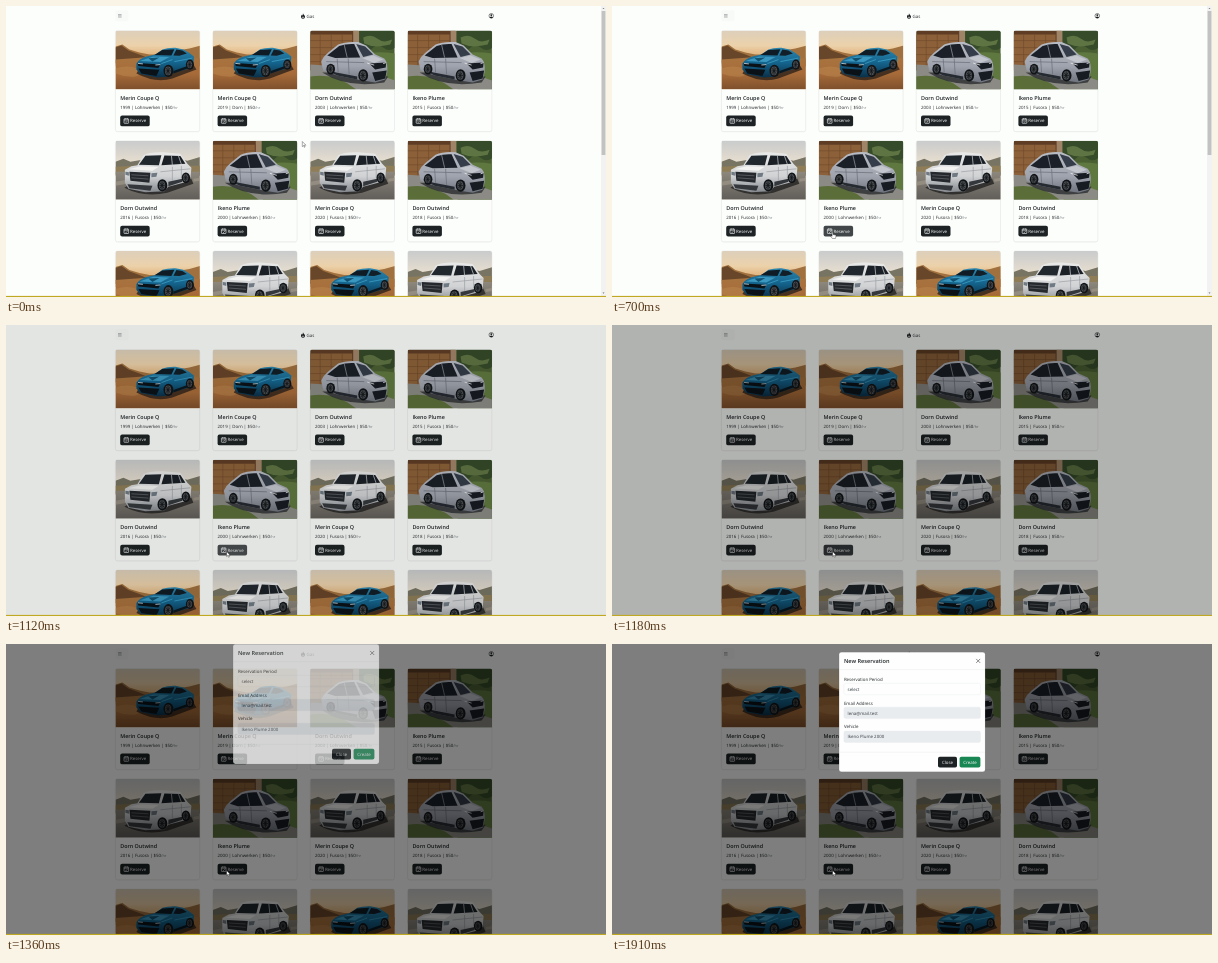
These frames come from a looping animation (600x291 px, 1940 ms). An HTML page:

```html
<!DOCTYPE html>
<html lang="en">
<head>
<meta charset="utf-8">
<title>Car reservation</title>
<style>
html, body { margin: 0; width: 100%; height: 100%; overflow: hidden; background: #fcfefb; }
svg { display: block; width: 100vw; height: 100vh; }
text { font-family: "Open Sans", "Noto Sans", sans-serif; font-size: 4.4px; fill: #212529; text-rendering: geometricPrecision; white-space: pre; }
.title { font-size: 5.4px; font-weight: 600; }
.light { fill: #fff; }
.muted { fill: #7d848a; font-size: 3.8px; }
</style>
</head>
<body>
<svg id="stage" viewBox="0 0 600 291" preserveAspectRatio="none">
  <defs>
    <linearGradient id="dusk" x2="0" y2="1">
      <stop stop-color="#dccfbb"/><stop offset=".25" stop-color="#ecd2ab"/><stop offset=".45" stop-color="#dfae74"/>
    </linearGradient>
    <linearGradient id="sand" x2="0" y2="1">
      <stop stop-color="#a8743f"/><stop offset=".5" stop-color="#a76b39"/><stop offset="1" stop-color="#7d4f2c"/>
    </linearGradient>
    <linearGradient id="overcast" x2="0" y2="1">
      <stop stop-color="#c9cbcc"/><stop offset=".4" stop-color="#e9dfcf"/>
    </linearGradient>
    <linearGradient id="road" x2="0" y2="1">
      <stop stop-color="#8d877c"/><stop offset="1" stop-color="#605d59"/>
    </linearGradient>
    <linearGradient id="blue" x2="0" y2="1">
      <stop stop-color="#2b86ae"/><stop offset=".5" stop-color="#14648d"/><stop offset="1" stop-color="#0a2f47"/>
    </linearGradient>
    <linearGradient id="silver" x2="0" y2="1">
      <stop stop-color="#b9bcc4"/><stop offset=".6" stop-color="#9fa3ad"/><stop offset="1" stop-color="#6d727c"/>
    </linearGradient>
    <linearGradient id="white" x2="0" y2="1">
      <stop stop-color="#e9e9e8"/><stop offset=".6" stop-color="#d0d2d4"/><stop offset="1" stop-color="#85898e"/>
    </linearGradient>
    <clipPath id="photo"><path d="M0 59V2Q0 0 2 0H82.3Q84.3 0 84.3 2V59Z"/></clipPath>

    <g id="wheel">
      <ellipse rx="4.9" ry="6.2" fill="#111417"/>
      <ellipse cx="-.3" rx="3.1" ry="4.3" fill="#4b4f53"/>
      <path d="M-.4-4V4M-3 0H2.4M-2.4-2.8 1.6 2.8M1.6-2.8-2.4 2.8" stroke="#15181b" stroke-width=".8"/>
    </g>

    <g id="coupe" clip-path="url(#photo)">
      <rect width="85" height="59" fill="url(#dusk)"/>
      <path d="M0 16 7 14 14 19 24 22 34 24H50L62 20 74 18 85 15V36H0Z" fill="#a0713f"/>
      <path d="M0 17 6 15 13 20 24 24 34 28 0 33Z" fill="#684629"/>
      <path d="M0 29 28 27 85 28V59H0Z" fill="url(#sand)"/>
      <path d="M0 38Q12 34 22 38T20 46Q10 47 0 43Z" fill="#bc8850" opacity=".5"/>
      <path d="M21 43Q40 53 57 48L81 39 78 34 24 38Z" fill="#35261c" opacity=".85"/>
      <path d="M21 33Q24 28 31 26L40 24 47 18.8Q52 17 60 17.2L68 18.8 74 22.5 78.5 26 78 34 74 38 58 42.5 54 46 42 47 25 43.5 21 39Z" fill="url(#blue)"/>
      <path d="M39 24.3 47 19.4 59 18.7 56 25Z" fill="#0f1c25"/>
      <path d="M58 24.8 61 18.9 67 19.9 71.5 22.9 64 25.1Z" fill="#121f28"/>
      <path d="M24 30.5 38 25.8 54 26.4 45 31.5Z" fill="#3a97bf"/>
      <path d="M33 27.6 44 27 37 31Z" fill="#12506f"/>
      <path d="M22 32.5 45 33.8 43 37.5 23 35.4ZM23 38 44 39.2 41 45.5 26 43Z" fill="#0a1218"/>
      <path d="M22.5 32.8 27.5 33.3M40 34.4 45 34" stroke="#cfe5ee" stroke-width=".8"/>
      <path d="M59 31 77 27.5M46 33 57 29" stroke="#3d9fc6" stroke-width=".8"/>
      <path d="M58 40.5 72 35.5V38L58 43Z" fill="#0a1821"/>
      <use href="#wheel" x="53" y="40.3"/><use href="#wheel" transform="translate(74.5 34) scale(.82)"/>
    </g>

    <g id="hatch" clip-path="url(#photo)">
      <rect width="85" height="59" fill="#4a5f32"/>
      <path d="M0 0H48V40H0Z" fill="#5f3d25"/>
      <path d="M0 4H42V36H0Z" fill="#8c6039"/>
      <path d="M0 10H42M0 17H42M0 24H42M0 31H42M10 4V36M21 4V36M32 4V36" stroke="#704a2a" stroke-width=".6"/>
      <path d="M43 0H49V38H43Z" fill="#a08467"/>
      <path d="M49 0H85V17Q79 22 73 17T61 19L49 18Z" fill="#354b29"/>
      <path d="M53 7Q61 3 67 8T82 9L80 14Q64 18 54 13Z" fill="#5f7443"/>
      <path d="M50 24Q66 20 85 23V59H50Z" fill="#5f783f"/>
      <path d="M0 34 47 37 85 50V59H0Z" fill="#8b8a84"/>
      <path d="M0 46Q26 42 46 59H0Z" fill="#5b6e3a"/>
      <path d="M12 42Q36 58 74 52L78 46 40 42Z" fill="#303334" opacity=".85"/>
      <path d="M11 31Q13 26 18 22L28 14Q36 10.5 48 11.5L56 15 65 24 74 28Q78 32 77 42L75 49 65 52 52 50 27 45 13 40Z" fill="url(#silver)"/>
      <path d="M17 25 29 15.5Q36 13 44 13.5L50 27 25 27.5Z" fill="#1b2028"/>
      <path d="M46 13.3 55 16 63 24 53 26.5Z" fill="#343d49"/>
      <path d="M34 14 37 27" stroke="#8a8e97" stroke-width=".8"/>
      <path d="M52 27.5 63 25 73 29 64 32.5Z" fill="#c3c6cd"/>
      <path d="M59 33 76 32 75.5 37 65 39ZM62 42 76.5 40 75 48 65 50.5Z" fill="#171b22"/>
      <path d="M57 32.5 64 34.5M73 33 76 32" stroke="#eceef0" stroke-width=".8"/>
      <path d="M15 39 26 42 47 46V49L27 45Z" fill="#262a31"/>
      <path d="M16 31 54 32M38 28 39 44M27 28 28 42" stroke="#686d77" stroke-width=".7"/>
      <use href="#wheel" x="53" y="44.8"/><use href="#wheel" transform="translate(20.5 38.5) scale(.88)"/>
    </g>

    <g id="suv" clip-path="url(#photo)">
      <rect width="85" height="59" fill="url(#overcast)"/>
      <path d="M0 21 8 18 15 21 27 19 44 20 62 18 72 20 85 16V35H0Z" fill="#777464"/>
      <path d="M0 26 18 25 85 25V34H0Z" fill="#8e7d57"/>
      <path d="M0 31H85V59H0Z" fill="url(#road)"/>
      <path d="M0 41 12 39V43L0 45ZM78 38 85 37V40L78 41Z" fill="#a39b8d" opacity=".6"/>
      <path d="M9 47Q28 57 52 52L78 43 75 36 20 40Z" fill="#282726" opacity=".85"/>
      <path d="M9.5 29 16 25.5 22 24.5 28 14.5Q34 11 48 11.5L65 13 72 23 76 27 75 38 68 42 53 46 49 50.5 30 51.5 13 48 9.5 42Z" fill="url(#white)"/>
      <path d="M23.5 24 30 15 46 14.4 43.5 24.5Z" fill="#21282e"/>
      <path d="M46 24.5 49 14.6 65 15.2 70 23Z" fill="#1a2026"/>
      <path d="M56 14.5 57 24.5M63 15 66 23.5" stroke="#b9bcbe" stroke-width=".8"/>
      <path d="M13 28.5 25 25.5 43 26.2 37 30Z" fill="#f3f3f2"/>
      <path d="M14 31 35 32 34 42 15 40Z" fill="#25292d"/>
      <path d="M16 34 33 35M16 37 33 38.3" stroke="#74787c" stroke-width=".6"/>
      <path d="M10 31 13.5 31.5V35L10 34ZM36 32.5 42 32 41 36 36 36.4Z" fill="#6f7a84"/>
      <path d="M12 43.5 37 45 35 50 14 47.5Z" fill="#34383c"/>
      <path d="M53 41 67 38V41L53 45.5Z" fill="#34383c"/>
      <path d="M45 31 75 28M57 26V40M66 25V37" stroke="#94989c" stroke-width=".6"/>
      <use href="#wheel" x="47" y="44.6"/><use href="#wheel" transform="translate(70.5 37) scale(.86)"/>
    </g>

    <g id="calendar" fill="none" stroke="#fff" stroke-width=".6">
      <rect width="4.6" height="4.5" rx=".5"/><path d="M0 1.2H4.6M1.2-.5V.5M3.4-.5V.5M1.4 2.8 2.1 3.5 3.4 2.2"/>
    </g>
  </defs>

  <rect width="600" height="291" fill="#fcfefb"/>
  <rect x="109.4" y="4.3" width="13" height="11" rx="1.8" fill="#f8faf8"/>
  <path d="M112 8.5H115.6M112 9.8H115.6M112 11.1H115.6" stroke="#777b7d" stroke-width=".5"/>
  <path d="M297 7.3C297.2 9 299 9.2 299 10.8A2 2 0 0 1 295 10.8C295 9.9 295.5 9.3 295.9 8.8L296.3 9.7C296.9 9 296.8 8.2 297 7.3Z" fill="#15181a"/>
  <path d="M297 10.2 297.8 11.4A.9.9 0 0 1 296.2 11.4Z" fill="#fcfefb"/>
  <text x="300.6" y="11.7">Gas</text>
  <circle cx="485.3" cy="9.8" r="2.3" fill="none" stroke="#15181a" stroke-width=".5"/>
  <circle cx="485.3" cy="9.1" r=".95" fill="#15181a"/>
  <path d="M483.6 11.5Q485.3 9.6 487 11.5 485.3 12.9 483.6 11.5Z" fill="#15181a"/>
  <g id="cards"></g>
  <g id="scrollbar">
    <rect x="595" width="5" height="291" fill="#f1f2f1"/>
    <rect x="595.6" y="5" width="3.8" height="144" fill="#c1c2c1"/>
    <path d="M596.5 3.1 597.5 1.9 598.5 3.1ZM596.5 286.5 597.5 287.7 598.5 286.5Z" fill="#65686a"/>
  </g>
  <rect id="backdrop" width="600" height="291"/>
  <g id="modal">
    <rect x="227.1" y="8.2" width="146" height="119.6" rx="2.3" fill="#fdfefd" stroke="#000" stroke-opacity=".18" stroke-width=".3"/>
    <path d="M227.2 25.6H373M227.2 108.2H373" stroke="#dee2e6" stroke-width=".35"/>
    <text class="title" x="231.9" y="19.3" style="font-size:5.6px">New Reservation</text>
    <path d="M364.2 14.9 368.2 18.9M368.2 14.9 364.2 18.9" stroke="#555" stroke-width=".7"/>
    <g id="fields"></g>
    <rect x="326" y="112.7" width="19" height="10.8" rx="1.8" fill="#1d2224"/>
    <rect x="347.6" y="112.7" width="20.8" height="10.8" rx="1.8" fill="#198754"/>
    <text class="light" x="335.5" y="119.7" text-anchor="middle">Close</text>
    <text class="light" x="358" y="119.7" text-anchor="middle">Create</text>
  </g>
  <g id="cursor" stroke-linejoin="round">
    <path id="arrow" d="M0 0V5.1L1.2 4 2 5.8 2.8 5.4 2 3.7H3.6Z" fill="#fff" stroke="#111" stroke-width=".35"/>
    <path id="beam" d="M-.9-2.6H.9M0-2.6V2.6M-.9 2.6H.9" stroke="#222" stroke-width=".4"/>
    <path id="hand" d="M-.5 0Q0-.6.5 0V2L3 2.6Q3.5 2.8 3.4 3.6L2.8 6H-.2L-1.9 3.8Q-1.7 3-.5 3.8Z" fill="#fff" stroke="#111" stroke-width=".35"/>
  </g>
  <rect y="289.9" width="600" height="1.1" fill="#bfa922"/>
</svg>
<script>
const $ = id => document.getElementById(id);
const LOOP = 1940;
const MODELS = { m: "Merin Coupe Q", d: "Dorn Outwind", i: "Ikeno Plume" };
const CARDS = [
  ["coupe", "m", 1999, "Lohnwerken"], ["coupe", "m", 2019, "Dorn"],
  ["hatch", "d", 2003, "Lohnwerken"], ["hatch", "i", 2015, "Fusora"],
  ["suv", "d", 2016, "Fusora"], ["hatch", "i", 2000, "Lohnwerken"],
  ["suv", "m", 2020, "Fusora"], ["hatch", "d", 2018, "Fusora"],
  ["coupe", "m", 2017, "Dorn"], ["suv", "i", 2012, "Fusora"],
  ["coupe", "d", 2014, "Dorn"], ["suv", "m", 2021, "Fusora"]
];

$("cards").innerHTML = CARDS.map(([photo, model, year, maker], i) => `
  <g transform="translate(${109.4 + i % 4 * 97.4} ${24.6 + Math.floor(i / 4) * 110.2})">
    <rect y=".6" width="84.3" height="101" rx="2" fill="#000" opacity=".04"/>
    <rect width="84.3" height="101" rx="2" fill="#fcfefb" stroke="#dcdfde" stroke-width=".4"/>
    <use href="#${photo}"/>
    <text class="title" x="4.8" y="69.4">${MODELS[model]}</text>
    <text x="4.8" y="78.3">${year} | ${maker} | $50<tspan class="muted">/hr</tspan></text>
    <rect class="reserve" x="4.8" y="85" width="29.5" height="10.7" rx="1.9"/>
    <use href="#calendar" x="8.6" y="88.2"/>
    <text class="light" x="14.7" y="91.9">Reserve</text>
  </g>`).join("");

$("fields").innerHTML = [
  ["Reservation Period", "select", "#fdfefd"],
  ["Email Address", "lena@mail.test", "#e9ecef"],
  ["Vehicle", "Ikeno Plume 2000", "#e9ecef"]
].map(([label, value, fill], i) => `
  <g transform="translate(231.9 ${36.6 + i * 23.9})">
    <text>${label}</text>
    <rect y="2.7" width="136.6" height="11.4" rx="1.8" fill="${fill}" stroke="#e3e7ea" stroke-width=".3"/>
    <text x="3.7" y="10.1" style="fill:#343a40">${value}</text>
  </g>`).join("");

const buttons = [...document.querySelectorAll(".reserve")];
const clamp = u => Math.max(0, Math.min(1, u));
const ramp = (t, start, length) => clamp((t - start) / length);
const smooth = u => u * u * (3 - 2 * u);
const show = (id, on) => $(id).setAttribute("visibility", on ? "visible" : "hidden");
const shade = (button, glow) =>
  button.setAttribute("fill", `rgb(${29 + glow},${34 + glow},${36 + glow})`);

function pointerKind(x, y, t) {
  if (t >= 1110) return "arrow";
  if (y > 219.7 && x < 241) return "hand";
  const overText = (y > 197 && y < 206 && x < 244) || (y > 208 && y < 215 && x < 264);
  return overText ? "beam" : "arrow";
}

function draw(t) {
  const move = smooth(ramp(t, 0, 600));
  const x = 296.3 - 75.7 * move, y = 135.5 + 91 * move;
  $("cursor").setAttribute("transform", `translate(${x} ${y})`);
  const kind = pointerKind(x, y, t);
  for (const id of ["arrow", "beam", "hand"]) show(id, id === kind);

  // Hover, press, then release behind the backdrop.
  shade(buttons[5], (36 * ramp(t, 500, 150) + 12 * ramp(t, 900, 100)) * (1 - ramp(t, 1110, 150)));

  show("scrollbar", t < 1110);
  $("backdrop").setAttribute("opacity", .5 * ramp(t, 1092, 150));
  $("modal").setAttribute("opacity", ramp(t, 1260, 150));
  const rest = Math.pow(1 - ramp(t, 1260, 300), 1.65);
  $("modal").setAttribute("transform", `translate(0 ${-15.6 * rest})`);
}

buttons.forEach(button => shade(button, 0));
const start = performance.now();
function tick() {
  draw((performance.now() - start) % LOOP);
  requestAnimationFrame(tick);
}
tick();
</script>
</body>
</html>
```
